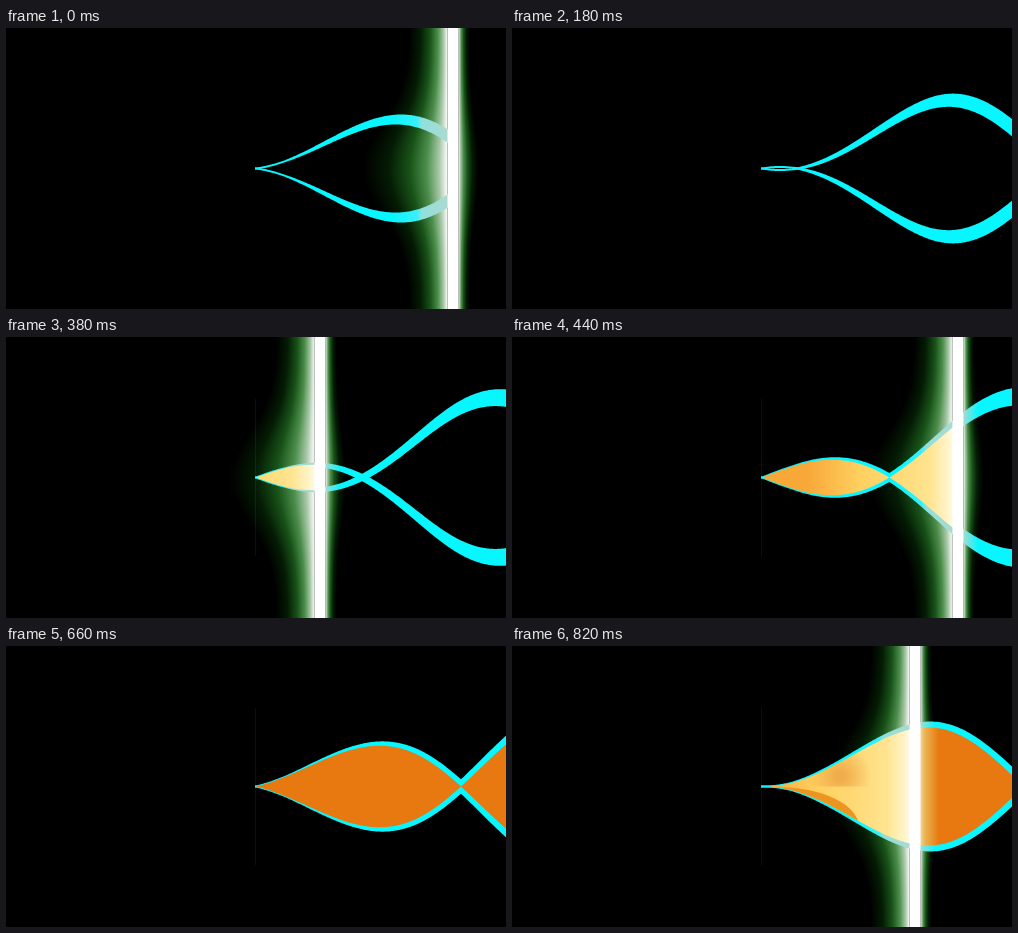
An HTML page with a canvas for the animation above (0.84 s loop, 500x281 px).

```html
<!DOCTYPE html>
<html lang="en">
<head>
<meta charset="utf-8">
<title>Wave and light beam</title>
<style>
  html, body { margin: 0; height: 100%; overflow: hidden; background: #000; }
  canvas { display: block; }
</style>
</head>
<body>
<canvas id="stage" width="500" height="281"></canvas>
<script>
const W = 500, H = 281, LOOP = 840, STEP = 20;
const ORIGIN = 250, MID = 140.5, HALF_WAVE = 258;
const CYAN = '#08f6ff', ORANGE = '#e87810';
const ctx = document.getElementById('stage').getContext('2d');

// Glow sprite: bell-shaped green light, longer on the left of the core.
const CORE = 110, CORE_HALF = 5.5;
const glow = makeGlow();

function addStops(gradient, stops) {
  stops.forEach(([at, color]) => gradient.addColorStop(at, color));
  return gradient;
}

function makeGlow() {
  const canvas = document.createElement('canvas');
  canvas.width = 160;
  canvas.height = H;
  const c = canvas.getContext('2d');
  const stops = [[0, '#000'], [.3, '#041c04'], [.55, '#185218'], [.75, '#4c8e4c'],
                 [.9, '#a8c8a8'], [1, '#fff']];
  for (let y = 0; y < H; y++) {
    const bell = Math.exp(-(((y - MID) / 62) ** 2));
    const left = CORE - CORE_HALF, right = CORE + CORE_HALF;
    for (const [from, to] of [[left - 38 - 46 * bell, left], [right + 11 + 9 * bell, right]]) {
      c.fillStyle = addStops(c.createLinearGradient(from, 0, to, 0), stops);
      c.fillRect(Math.min(from, to), y, Math.abs(to - from), 1);
    }
  }
  return canvas;
}

function beamX(t) {
  if (t < 200) return 447 + 2.2 * t;
  if (t < 640) return 2.2 * (t - 237.3);
  return 403 + 2.9 * (t - 820);
}

// Travelling sine whose height grows away from the origin and then levels off.
function waveY(x, t) {
  const d = x - ORIGIN, node = 222 + .353 * t;
  const height = .395 * d / (1 + (d / 210) ** 8) ** .125;
  return height * Math.sin(Math.PI * (x - node) / HALF_WAVE);
}

// Closed band between two heights given as functions of x.
function bandPath(upper, lower) {
  ctx.beginPath();
  for (let x = ORIGIN - 1; x <= W + 2; x++) ctx.lineTo(x, upper(x));
  for (let x = W + 2; x >= ORIGIN - 1; x--) ctx.lineTo(x, lower(x));
  ctx.closePath();
}

function drawStrands(t, beam) {
  ctx.fillStyle = addStops(ctx.createLinearGradient(beam - 60, 0, beam + 20, 0), [
    [0, CYAN], [.3, '#38f0fc'], [.36, '#90e0dc'], [.8, '#b4d8cc'], [1, CYAN]]);
  const half = x => Math.max(1, .035 * (x - ORIGIN));
  for (const side of [-1, 1]) {
    const y = x => MID + side * waveY(x, t);
    bandPath(x => y(x) - half(x), x => y(x) + half(x));
    ctx.fill();
  }
}

function drawFill(t, beam) {
  const firstPass = t < 640, lit = beam > ORIGIN - 24 && beam < W + 10;
  ctx.save();
  bandPath(x => MID - waveY(x, t), x => MID + waveY(x, t));
  ctx.clip();
  ctx.fillStyle = lit ? trailColor(beam) : ORANGE;
  ctx.fillRect(ORIGIN, 0, firstPass ? beam - ORIGIN : W, H);
  if (lit && !firstPass) drawShade(beam);
  ctx.restore();
}

// Pale light left behind the beam, with a short glow ahead of it.
function trailColor(beam) {
  return addStops(ctx.createLinearGradient(beam - 150, 0, beam + 24, 0), [
    [0, '#f8a838'], [.3, '#ffd060'], [.5, '#ffd874'], [.7, '#ffe490'],
    [.8, '#fff4c8'], [.86, '#fff'], [.92, '#e8b450'], [1, ORANGE]]);
}

function drawShade(beam) {
  const x = beam - 75, y = 130;
  ctx.fillStyle = addStops(ctx.createRadialGradient(x, y, 4, x, y, 32),
    [[0, '#eca040c0'], [1, '#eca04000']]);
  ctx.fillRect(ORIGIN, 0, beam - ORIGIN, MID);
  ctx.fillStyle = '#ee9420';
  ctx.beginPath();
  ctx.ellipse(beam - 138, 181, 82, 40, 0, 0, 2 * Math.PI);
  ctx.fill();
}

function draw(t) {
  const beam = beamX(t), filled = t > 600 || (t > 300 && beam > ORIGIN);
  ctx.fillStyle = '#000';
  ctx.fillRect(0, 0, W, H);
  if (filled) {
    ctx.fillStyle = '#0e0e0e';
    ctx.fillRect(ORIGIN - 1, 62, 1, 157);
  }
  ctx.globalCompositeOperation = 'lighter';
  ctx.drawImage(glow, beam - CORE, 0);
  ctx.globalCompositeOperation = 'source-over';

  // The opening pass of the beam uncovers the strands, the next one the fill.
  ctx.save();
  ctx.beginPath();
  ctx.rect(0, 0, t < 200 ? beam : W, H);
  ctx.clip();
  drawStrands(t, beam);
  if (filled) drawFill(t, beam);
  ctx.restore();

  ctx.fillStyle = '#fff';
  ctx.fillRect(beam - CORE_HALF, 0, 2 * CORE_HALF, H);
}

const start = performance.now();
function tick() {
  const t = (performance.now() - start) % LOOP;
  draw(Math.floor(t / STEP) * STEP);
  requestAnimationFrame(tick);
}
tick();
</script>
</body>
</html>
```
